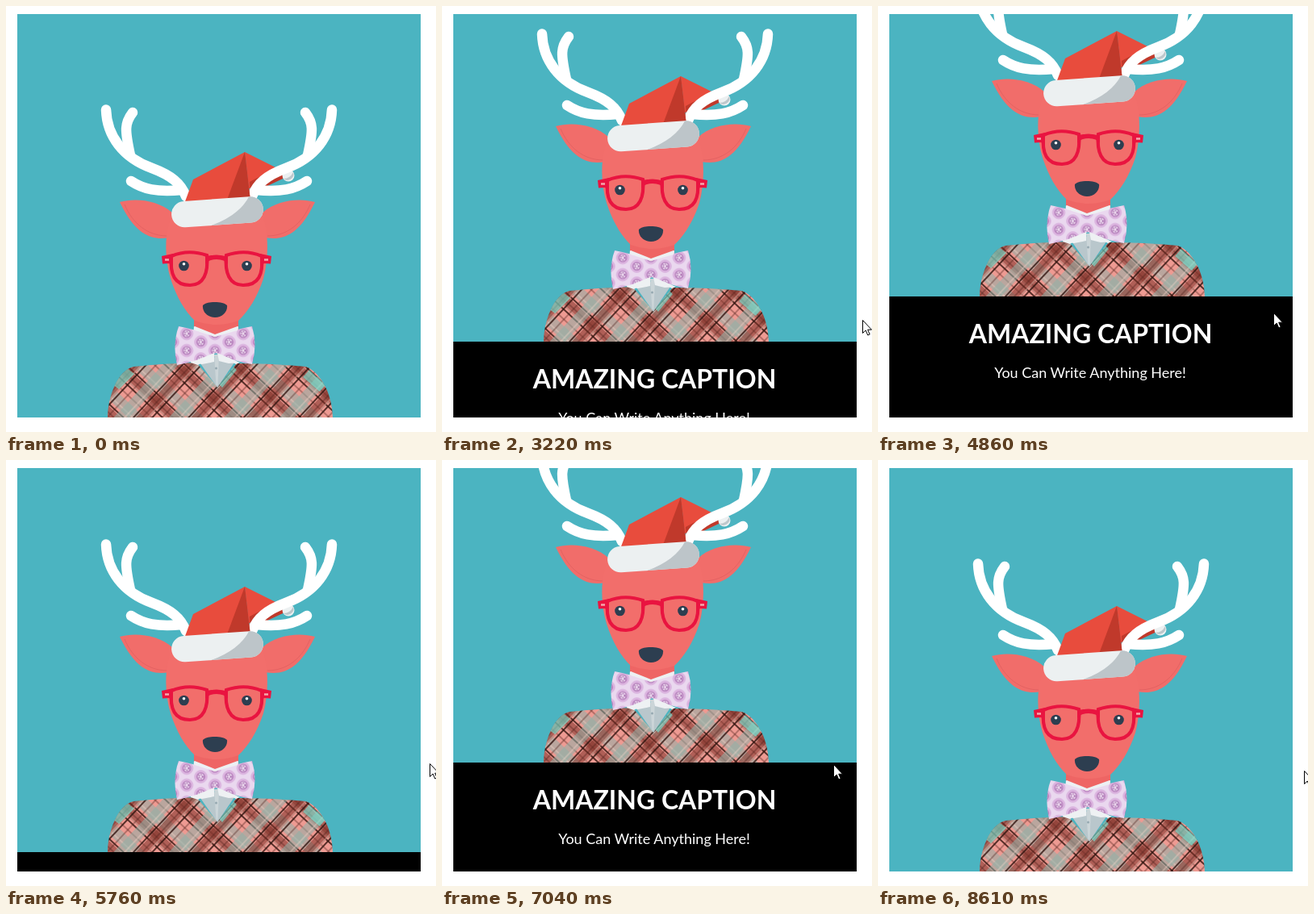
Write an HTML page that moves like this. It is 533 px wide and 528 px high and loops after 9.07 s.

```html
<!DOCTYPE html>
<html lang="en">
<head>
<meta charset="utf-8">
<title>Sliding caption</title>
<style>
  html, body { margin: 0; width: 100%; height: 100%; overflow: hidden; background: #fff; }
  svg { display: block; }
  text { font-family: Lato, sans-serif; fill: #fff; text-anchor: middle; }
</style>
</head>
<body>
<svg width="533" height="528" viewBox="0 0 533 528">
  <defs>
    <clipPath id="card"><rect x="14" y="10" width="500" height="500"/></clipPath>
    <clipPath id="brim"><rect x="205" y="239" width="114" height="32.500" rx="16.200" transform="rotate(-4 262 255)"/></clipPath>
    <path id="sweater" d="M126 511C126 485 138 452 158 447Q196 443 236 442L262 472L286 443Q330 443 372 447C392 455 405 484 405 511Z"/>
    <clipPath id="body"><use href="#sweater"/></clipPath>

    <pattern id="plaid" width="50" height="50" patternUnits="userSpaceOnUse" patternTransform="translate(256 449) rotate(43)">
      <rect width="50" height="50" fill="#ee9a92"/>
      <g id="weave">
        <path d="M0 9H50" stroke="#8fb0a8" stroke-width="14" opacity=".55"/>
        <path d="M0 28H50" stroke="#7d2f25" stroke-width="12" opacity=".55"/>
        <path d="M0 20H50M0 37H50" stroke="#32130f" stroke-width="2" opacity=".8"/>
        <path d="M0 28H50M0 46H50" stroke="#4b1d17" opacity=".7"/>
        <path d="M0 12H50M0 33H50" stroke="#f5d4c9" opacity=".7"/>
      </g>
      <use href="#weave" transform="matrix(0 1 1 0 0 0)"/>
    </pattern>

    <pattern id="dots" x="206.500" y="395.500" width="35" height="21" patternUnits="userSpaceOnUse">
      <rect width="35" height="21" fill="#ead8ef"/>
      <g id="flower" fill="none">
        <circle cx="17.500" cy="10.500" r="7.500" fill="#dfb9e2" stroke="#d3a4d8"/>
        <circle cx="17.500" cy="10.500" r="4.700" fill="#f1e3f3" stroke="#9e5ba6" stroke-width="1.100"/>
        <circle cx="17.500" cy="10.500" r="2.400" stroke="#9e5ba6" stroke-width="2" stroke-dasharray="1.2 1.3"/>
      </g>
      <use href="#flower" x="-17.500" y="-10.500"/>
      <use href="#flower" x="17.500" y="-10.500"/>
      <use href="#flower" x="-17.500" y="10.500"/>
      <use href="#flower" x="17.500" y="10.500"/>
    </pattern>
  </defs>

  <g clip-path="url(#card)">
    <g id="slide">
      <rect x="14" y="10" width="500" height="501" fill="#4bb4c1"/>

      <!-- sweater and shirt -->
      <use href="#sweater" fill="url(#plaid)"/>
      <path d="M132 469L150 449L159 456L140 475ZM262 466L279 444L286 451L268 473ZM368 460L376 451L396 470L389 478Z" clip-path="url(#body)" fill="#72ead9" opacity=".6"/>
      <path d="M236 436H287L262 473Z" fill="#b9c7cc"/>
      <path d="M258 432H264L262.500 470H260.500Z" fill="#cbd5d8"/>
      <circle cx="260.500" cy="449" r="1.500" fill="#96a9b2"/>

      <!-- head -->
      <path d="M233 375H288V404L259 411L233 402Z" fill="#ee6564"/>
      <g id="ear">
        <path d="M141 243C160 238 188 240 207 257L211 285C184 293 162 287 141 243Z" fill="#f16d6a"/>
        <path d="M147 246C157 270 176 285 200 285" fill="none" stroke="#dc5d5e" opacity=".65"/>
      </g>
      <use href="#ear" transform="matrix(-1 0 0 1 524 0)"/>
      <path d="M207 256C196 278 196 312 204 338C211 360 222 379 234 390Q260 400 288 390C300 379 312 360 319 338C326 312 326 278 316 253Z" fill="#f26e6b"/>

      <!-- hat and antlers -->
      <path d="M296 181L348 207L343 214L301 226Z" fill="#e84c3d"/>
      <path d="M302 218Q320 206 347 207L343 214L303 233Z" fill="#c0392b"/>
      <circle cx="350" cy="210" r="7.500" fill="#ecf0f1"/>
      <path d="M356 206A7.500 7.500 0 0 1 344 214Q352 214 356 206Z" fill="#bdc7cb"/>
      <g id="antler" fill="none" stroke="#fff" stroke-width="12.500" stroke-linecap="round">
        <path d="M124 128.500C125 161 145 188 181 201C205 210 217 220 223 236"/>
        <path d="M157 132C147 145 147 153 154 185"/>
        <path d="M155 217C170 227 187 231 218 228"/>
      </g>
      <use href="#antler" transform="matrix(-1 0 0 1 528 0)"/>
      <path d="M221 245L232 215L296 181L303 242Z" fill="#e84c3d"/>
      <path d="M296 181L274 240L303 241Z" fill="#c0392b"/>
      <g clip-path="url(#brim)">
        <path d="M200 230H325V280H200Z" fill="#ecf0f1"/>
        <path d="M242 276Q292 262 304 230H325V280Z" fill="#bdc5c9"/>
      </g>

      <!-- face -->
      <g id="eye"><circle cx="220.500" cy="322" r="6.300" fill="#2d3e50"/><circle cx="220.500" cy="319.700" r="1.800" fill="#fff"/></g>
      <use href="#eye" x="78"/>
      <g id="half">
        <path d="M205 310Q226 301 249 309C251 331 245 346 228 346C209 346 203 333 205 310Z" fill="none" stroke="#e91440" stroke-width="4.200"/>
        <path d="M193 310L207 307V322L202 319L194 319.500Z" fill="#e91440"/>
        <path d="M197 314.500H202" stroke="#f5a7ad" stroke-width="2.500"/>
      </g>
      <use href="#half" transform="matrix(-1 0 0 1 522 0)"/>
      <path d="M247 311Q261 306 275 311V320Q271 314 261 314T247 320Z" fill="#e91440"/>
      <path d="M244 371C249 365.500 269 365.500 274 371C275 379 268 386 259 386C250 386 243 379 244 371Z" fill="#2d3e50"/>

      <!-- collar and bow tie -->
      <path d="M233 397L259 410L288 397L287 414L261 431L289 442L285 444L260 430L238 445L229 442Z" fill="#f0f2f5"/>
      <path d="M214 397Q236 401 259 410Q282 401 305 397Q312 420 305 444Q284 441 260 430Q237 440 212 445Q206 420 214 397Z" fill="url(#dots)"/>
      <path d="M234 397V402L259 410L287 402V397L259 407Z" fill="#edf0f3"/>
      <path d="M258 430L230 442L243 444L258 441ZM262 430L290 442L276 443L264 440Z" fill="#eef1f3"/>

      <!-- caption -->
      <rect x="14" y="510" width="500" height="150"/>
      <text x="263.500" y="568" font-size="32" font-weight="700">AMAZING CAPTION</text>
      <text x="263" y="611" font-size="18">You Can Write Anything Here!</text>
    </g>
  </g>
  <path id="cursor" d="M.5.5V16.500L4.200 13L6.800 19L9.200 18L6.700 12.200H11.500Z" fill="#fff" stroke="#000"/>
</svg>
<script>
const LOOP = 9070, SLIDE = 500, HEIGHT = 150;
const hovers = [[1770, 3104], [4240, 5490], [6730, 8080]];
// Pointer glides: start, end, x, y
const glides = [
  [840, 1000, 456, 521], [1040, 1200, 458, 530],
  [1740, 2200, 438, 451], [2480, 3360, 521, 389],
  [4040, 4860, 490, 380], [5320, 6280, 532, 375],
  [6600, 7260, 483, 377], [7950, 8610, 528, 385]
];
const slide = document.getElementById('slide');
const cursor = document.getElementById('cursor');
const clamp = x => Math.min(1, Math.max(0, x));
const easeOut = x => 1 - (1 - clamp(x)) ** 3;

// CSS "ease" timing curve
function ease(x) {
  x = clamp(x);
  let lo = 0, hi = 1, u;
  for (let i = 0; i < 18; i++) {
    u = (lo + hi) / 2;
    if (.75 * u * (1 - u) + u ** 3 < x) lo = u; else hi = u;
  }
  return .3 * u * (1 - u) ** 2 + 3 * u * u * (1 - u) + u ** 3;
}

function pointer(t) {
  return glides.reduce(([px, py], [from, to, x, y]) => {
    const k = easeOut((t - from) / (to - from));
    return [px + (x - px) * k, py + (y - py) * k];
  }, [460, 530]).map(Math.round);
}

const start = performance.now();
function draw() {
  const t = (performance.now() - start) % LOOP;
  const shown = hovers.reduce((sum, [on, off]) =>
    sum + ease((t - on) / SLIDE) - ease((t - off) / SLIDE), 0);
  slide.setAttribute('transform', `translate(0 ${-Math.round(shown * HEIGHT)})`);
  cursor.setAttribute('transform', `translate(${pointer(t)})`);
  requestAnimationFrame(draw);
}
draw();
</script>
</body>
</html>
```
